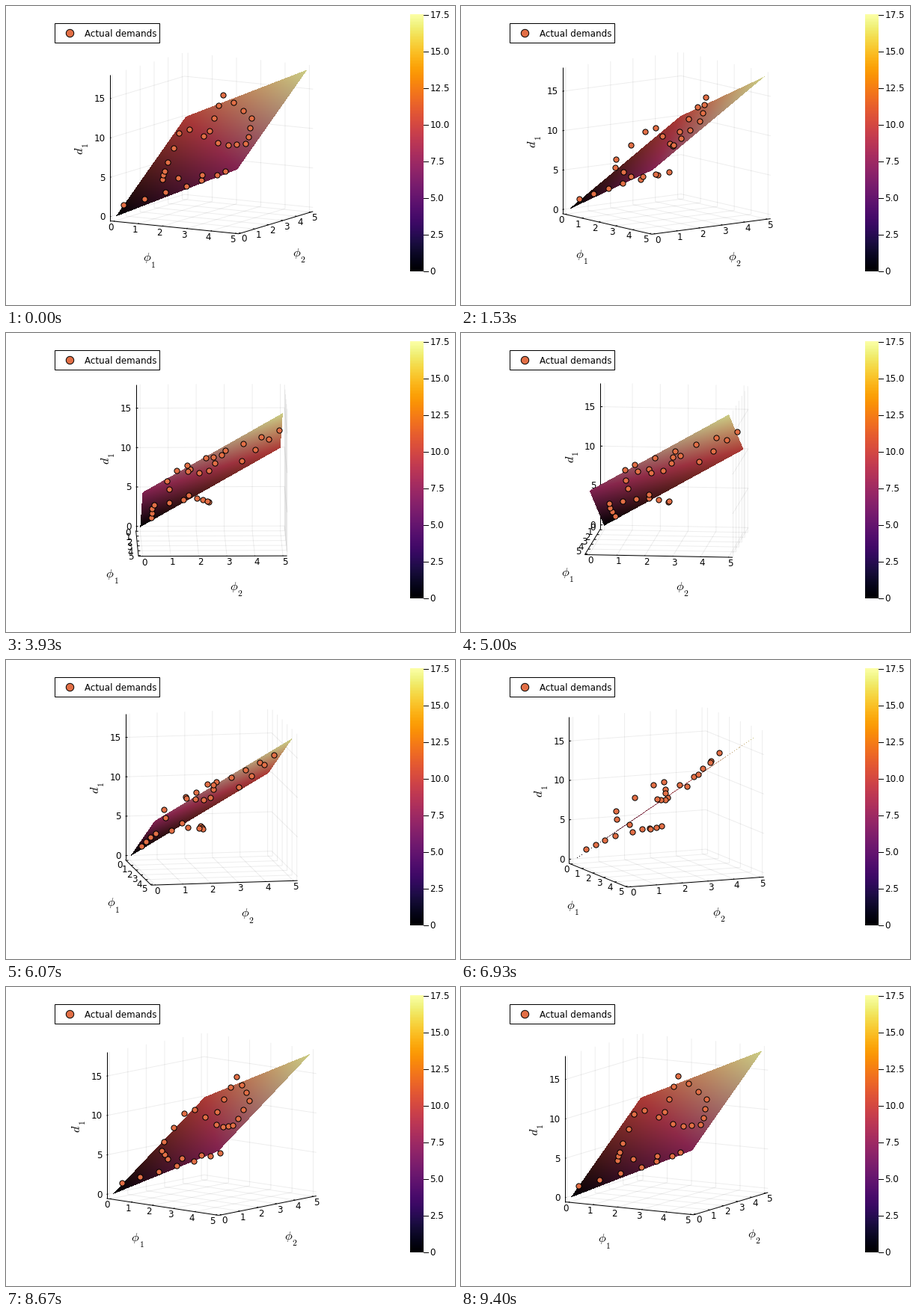
Write a matplotlib script that moves like this. It is 600 px wide and 400 px high and loops after 9470 ms.

```python
import numpy as np
import matplotlib
import matplotlib.pyplot as plt
from matplotlib.animation import FuncAnimation
from matplotlib.collections import LineCollection
from matplotlib.patches import Rectangle

matplotlib.rcParams["font.family"] = "DejaVu Sans"
matplotlib.rcParams["mathtext.fontset"] = "cm"

WIDTH, HEIGHT, DPI = 600, 400, 100
PT = 72 / DPI                       # points per pixel
LOOP_MS = 9470
LAST = 141                          # last one-degree step of the swing
FRAMES = LAST + 2                   # the final pose rests for one extra frame

# Orthographic camera
CX, CY, SIDE = 274.6, 183.4, 198.6
SIN_EL, COS_EL = np.sin(np.radians(10)), np.cos(np.radians(10))

# Plane d_1 = 1.5 phi_1 + 2 phi_2 over 0..5, axis limits padded by 3 %
SPAN = np.array([5, 5, 17.5])
LO, HI = -0.03 * SPAN, 1.03 * SPAN
X_TICKS = Y_TICKS = range(6)
Z_TICKS = range(0, 16, 5)

TEXT, LABEL, SUB = 11.9, 16.4, 11.6
ORANGE = "#e26f46"
INFERNO = matplotlib.colormaps["inferno"]
SHADE = 0.81                        # light from straight above

# The demands are strung along a zigzag through the plot
TURNS = np.array([
    (0.1, 0.4, 1.3), (2.6, 0.4, 4.4), (3.6, 1.9, 5.9), (0.4, 2.6, 3.3),
    (1.7, 0.6, 6.3), (1.0, 3.0, 10.2), (3.1, 2.3, 8.7), (4.8, 1.1, 10.2),
    (3.8, 3.1, 12.2), (1.5, 5.0, 13.3), (1.8, 3.6, 9.5)])
ALONG = np.linspace(0, len(TURNS) - 1, 30)
DEMANDS = np.stack([np.interp(ALONG, range(len(TURNS)), column)
                    for column in TURNS.T], axis=-1)

fig = plt.figure(figsize=(WIDTH / DPI, HEIGHT / DPI), dpi=DPI, facecolor="white")
ax = fig.add_axes([0, 0, 1, 1])
ax.axis("off")


def project(points, az):
    """Map data points to stage pixels for azimuth az in radians."""
    u, v, w = np.moveaxis((np.asarray(points, float) - LO) / (HI - LO) - 0.5, -1, 0)
    c, s = np.cos(az), np.sin(az)
    x = CX + SIDE * (u * c + v * s)
    y = CY + SIDE * (SIN_EL * (u * s - v * c) - COS_EL * w)
    return np.stack([x, y], axis=-1)


def text(x, y, s, size=TEXT, ha="center", **kw):
    """Text whose digits are centred on y."""
    return ax.text(x, y + 0.365 * size, s, fontsize=size * PT, ha=ha,
                   va="baseline", color="black", **kw)


def math(s, size, **kw):
    return ax.text(0, 0, f"${s}$", fontsize=size * PT, ha="center",
                   va="baseline", color="black", zorder=2, **kw)


def dots(points, radius, zorder):
    x, y = np.transpose(points)
    return ax.scatter(x, y, s=(2 * radius * PT) ** 2, c=ORANGE,
                      edgecolors="black", linewidths=PT, zorder=zorder)


# Surface raster, sampled at pixel centres
LEFT, RIGHT, UP, DOWN = 90, 420, 60, 310
PX, PY = np.meshgrid(np.arange(LEFT, RIGHT) + 0.5, np.arange(UP, DOWN) + 0.5)
CORNERS = np.array([(0, 0, 0), (5, 0, 7.5), (0, 5, 10), (5, 5, 17.5)])
TINTS = np.array([INFERNO(z / SPAN[2])[:3] for z in CORNERS[:, 2]]) * SHADE


def surface(az):
    """Two triangles, each blending the colours of its corners."""
    origin, a, b = project(CORNERS[:3], az)
    a, b = a - origin, b - origin
    dx, dy = PX - origin[0], PY - origin[1]
    det = a[0] * b[1] - a[1] * b[0]
    p = (dx * b[1] - dy * b[0]) / det
    q = (a[0] * dy - a[1] * dx) / det
    near = np.stack([1 - p - q, p, q, 0 * p], axis=-1)
    far = np.stack([0 * p, 1 - q, 1 - p, p + q - 1], axis=-1)
    weights = np.where((p + q < 1)[..., None], near, far)
    inside = (p >= 0) & (p <= 1) & (q >= 0) & (q <= 1)
    return np.dstack([np.clip(weights @ TINTS, 0, 1), inside])


# Grid, axes and tick marks as 3D polylines
(x0, y0, z0), (x1, y1, z1) = LO, HI
tick = 0.015 * (x1 - x0)
grid_lines = np.array(
    [[(t, y0, z0), (t, y1, z0), (t, y1, z1)] for t in X_TICKS]
    + [[(x1, t, z0), (x0, t, z0), (x0, t, z1)] for t in Y_TICKS]
    + [[(x0, y0, t), (x0, y1, t), (x1, y1, t)] for t in Z_TICKS])
axis_lines = np.array(
    [[(x0, y0, z0), (x1, y0, z0)], [(x1, y0, z0), (x1, y1, z0)],
     [(x0, y0, z0), (x0, y0, z1)]]
    + [[(t, y0, z0), (t, y0 + tick, z0)] for t in X_TICKS]
    + [[(x1, t, z0), (x1 - tick, t, z0)] for t in Y_TICKS]
    + [[(x0, y0, t), (x0, y0 + tick, t)] for t in Z_TICKS])

grid = LineCollection([], colors="black", alpha=0.07, linewidths=PT, zorder=1)
axes = LineCollection([], colors="black", linewidths=PT, zorder=2)
ax.add_collection(grid)
ax.add_collection(axes)
plane = ax.imshow(np.zeros(PX.shape + (4,)), extent=(LEFT, RIGHT, DOWN, UP),
                  interpolation="nearest", aspect="auto", zorder=4)
cloud = dots(DEMANDS[:, :2], 3.6, 5)

x_names = [text(0, 0, str(t), zorder=2) for t in X_TICKS]
y_names = [text(0, 0, str(t), zorder=2) for t in Y_TICKS]
z_names = [text(0, 0, str(t), ha="right", zorder=2) for t in Z_TICKS]
upright = dict(rotation=90, rotation_mode="anchor")
phi1, phi1_sub = math(r"\phi", LABEL), math("1", SUB)
phi2, phi2_sub = math(r"\phi", LABEL), math("2", SUB)
dem, dem_sub = math("d", LABEL, **upright), math("1", SUB, **upright)

# Legend
ax.add_patch(Rectangle((64.5, 22.5), 140.5, 26, fc="white", ec="black",
                       lw=PT, zorder=6))
dots([(84.7, 36)], 5.2, 7)
text(104.6, 36.4, "Actual demands", ha="left", zorder=7)

# Colour bar
BAR_TOP, BAR_END = 11.5, 355
ax.imshow(np.linspace(1, 0, 256)[:, None], cmap=INFERNO,
          extent=(540, 558, BAR_END, BAR_TOP), aspect="auto", zorder=3)
for k, y in enumerate(np.linspace(BAR_END, BAR_TOP, 8)):
    ax.plot([558, 564], [y, y], color="black", lw=PT, zorder=3)
    text(566.5, y, f"{2.5 * k:.1f}" if k else "0", ha="left")

ax.set_xlim(0, WIDTH)
ax.set_ylim(HEIGHT, 0)


def place(names, points, shift):
    for name, (x, y) in zip(names, points + shift):
        name.set_position((x, y + 0.365 * TEXT))


def unit(x, y):
    return np.array([x, y]) / np.hypot(x, y)


def draw(i):
    # Swing from 30 to 100 degrees and back, one degree a step
    step = min(i, LAST)
    az = np.radians(30 + min(step, LAST - step))
    c, s = np.cos(az), np.sin(az)

    grid.set_segments(project(grid_lines, az))
    axes.set_segments(project(axis_lines, az))
    plane.set_data(surface(az))
    cloud.set_offsets(project(DEMANDS, az))

    # Tick labels sit perpendicular to their axis
    place(x_names, project([(t, y0, z0) for t in X_TICKS], az),
          7.5 * unit(-SIN_EL * s, c) + (-2.9, 0.2))
    place(y_names, project([(x1, t, z0) for t in Y_TICKS], az),
          7.5 * unit(SIN_EL * c, s) + (2.5, 0))
    place(z_names, project([(x0, y0, t) for t in Z_TICKS], az), (-6, 0))

    mid_x, mid_y, mid_z = project(axis_lines[:3], az).mean(axis=1)
    for main, sub, mid, dx in ((phi1, phi1_sub, mid_x, -36.4),
                               (phi2, phi2_sub, mid_y, 28.1)):
        main.set_position(mid + (dx, 45.3))
        sub.set_position(mid + (dx + 8, 53.4))
    dem.set_position(mid_z + (-35.6, 4.3))
    dem_sub.set_position(mid_z + (-28.8, -3.2))
    return []


anim = FuncAnimation(fig, draw, frames=FRAMES, interval=LOOP_MS / FRAMES,
                     init_func=lambda: draw(0), repeat=True, repeat_delay=0,
                     blit=False)
plt.show()
```
